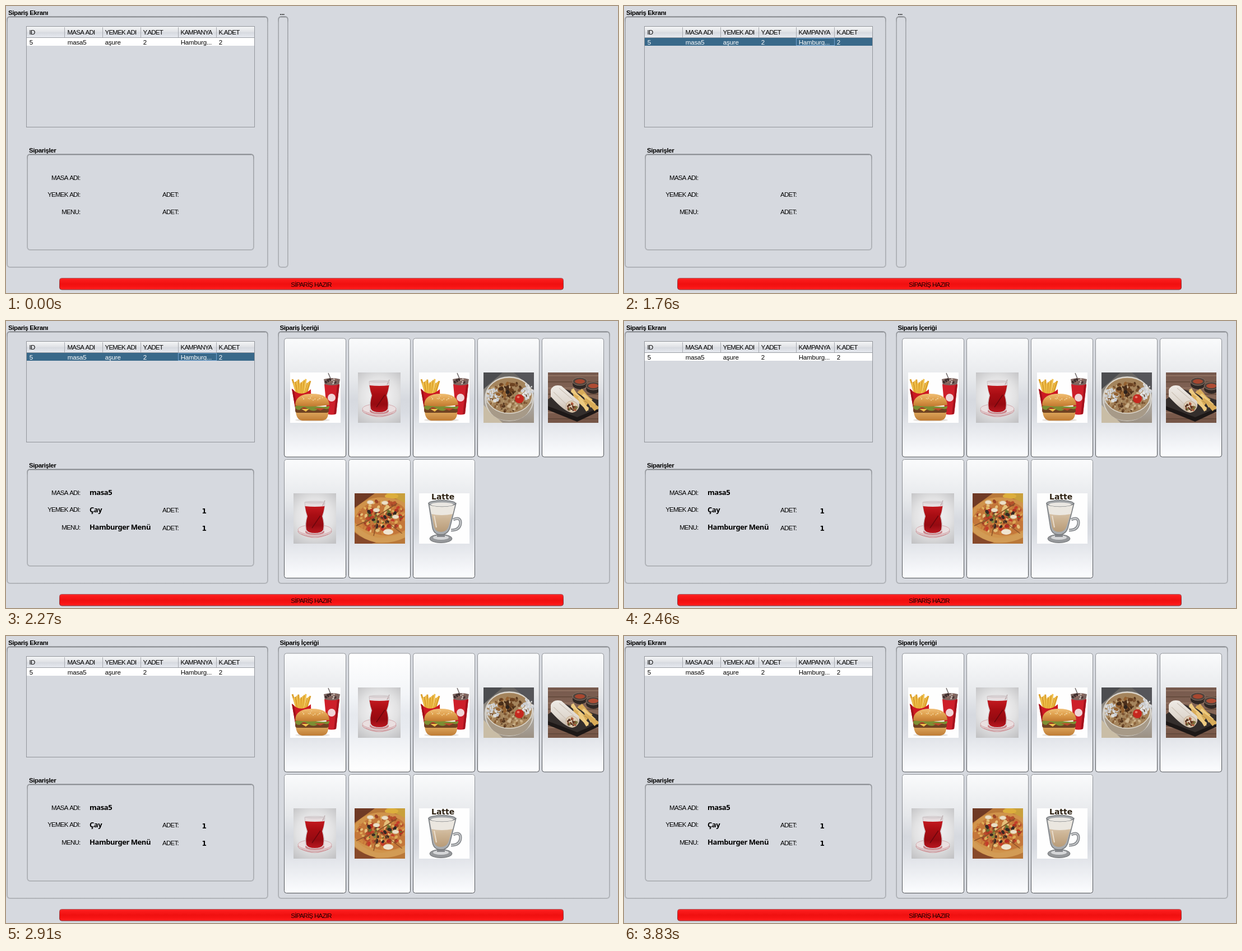
An HTML page with a canvas that plays this animation: 1092 by 513 pixels, repeating every 4390 ms.

```html
<!DOCTYPE html>
<html lang="tr">
<head>
<meta charset="utf-8">
<title>Sipariş Ekranı</title>
<style>
html, body { margin: 0; width: 100%; height: 100%; overflow: hidden; background: #d6d9df; }
canvas { display: block; }
</style>
</head>
<body>
<canvas id="stage" width="1092" height="513"></canvas>
<script>
const ctx = document.getElementById('stage').getContext('2d');
const LOOP = 4390;
const SELECT = 1760, OPEN = 1990, DESELECT = 2460, HOVER = [2830, 2910, 3000];
const SANS = '"Liberation Sans", Arial, sans-serif';
const PLAIN = { font: '11.5px ' + SANS, gap: -0.15 };
const CAPS = { font: '11.5px ' + SANS, gap: -0.75 };
const BOLD = { font: 'bold 11.5px ' + SANS, gap: -0.4 };
const VALUE = { font: 'bold 13px "Noto Sans", "Open Sans", sans-serif', gap: -0.45 };
const DIGIT = { font: 'bold 12px "DejaVu Sans", sans-serif', gap: 0 };
const MUG = { font: 'bold 14px "DejaVu Sans", sans-serif', gap: 0 };

function text(s, x, y, style, color = '#000', align = 'left') {
  ctx.font = style.font;
  ctx.letterSpacing = style.gap + 'px';
  ctx.textAlign = align;
  ctx.fillStyle = color;
  ctx.fillText(s, x, y);
}

function rect(x, y, w, h, color) {
  ctx.fillStyle = color;
  ctx.fillRect(x, y, w, h);
}

// Vertical gradient from [offset, colour] stops
function shade(y0, y1, ...stops) {
  const g = ctx.createLinearGradient(0, y0, 0, y1);
  stops.forEach(([at, c]) => g.addColorStop(at, c));
  return g;
}

function paint(fill, stroke, line = 1) {
  if (fill) { ctx.fillStyle = fill; ctx.fill(); }
  if (stroke) { ctx.strokeStyle = stroke; ctx.lineWidth = line; ctx.stroke(); }
}

function round(x, y, w, h, r, fill, stroke, line) {
  ctx.beginPath();
  ctx.roundRect(x, y, w, h, r);
  paint(fill, stroke, line);
}

function oval(x, y, rx, ry, fill, stroke, line, turn = 0) {
  ctx.beginPath();
  ctx.ellipse(x, y, rx, ry, turn, 0, 7);
  paint(fill, stroke, line);
}

function path(d, fill, stroke, line = 1) {
  const p = new Path2D(d);
  if (fill) { ctx.fillStyle = fill; ctx.fill(p); }
  if (stroke) { ctx.strokeStyle = stroke; ctx.lineWidth = line; ctx.stroke(p); }
}

function stick(x, y, w, h, turn, color) {
  ctx.save();
  ctx.translate(x, y);
  ctx.rotate(turn);
  rect(-w / 2, -h / 2, w, h, color);
  ctx.restore();
}

function seeded(seed) {
  return () => (seed = (seed * 16807) % 2147483647) / 2147483647;
}

function crumbs(n, seed, x, y, rx, ry, size, colors) {
  const rnd = seeded(seed);
  for (let i = 0; i < n; i++) {
    const a = rnd() * 6.283, d = Math.sqrt(rnd()), s = size * (0.6 + rnd() * 0.7);
    oval(x + Math.cos(a) * d * rx, y + Math.sin(a) * d * ry, s, s * 0.7,
      colors[i % colors.length], null, 1, rnd() * 3);
  }
}

function burger() {
  rect(0, 0, 90, 90, '#fefefe');
  for (let i = 0; i < 13; i++) {
    const k = i - 6;
    stick(20 + k * 2, 25 + i * 7 % 9, 3, 27, k * 0.05, i % 2 ? '#f0c04c' : '#dca02c');
  }
  path('M3 29Q19 46 37 30L38 69H10Z', '#cc1822');
  path('M3 29L7 32L14 69H10Z', '#a30f1a');
  path('M73 13L68 1', null, '#6d6666', 1.5);
  path('M60 12Q75 8 89 12L87 23H62Z', '#7c6560');
  crumbs(16, 9, 75, 16, 12, 4, 2, ['#3c2b2a', '#cdbdb5', '#8f6a5f']);
  path('M61 21Q75 25 88 21L82 74Q74 77 66 74Z', '#cd1f2a');
  path('M84 23L88 21L82 74L78 75Z', '#a5121d');
  oval(74, 45, 7, 7, '#f0d5d7');
  oval(40, 85, 31, 2.5, '#e4dfda');
  path('M10 69H68Q69 85 57 86H22Q11 85 10 69Z', shade(69, 86, [0, '#e0ab60'], [1, '#bf7c35']));
  round(9, 64, 60, 8, 4, '#6f4222');
  path('M9 60Q23 55 40 59T70 60Q71 67 62 65T47 67T32 65T17 67Q8 67 9 60Z', '#7c8f33');
  path('M20 65H34L28 70Z', '#f0bf4c');
  path('M43 64H62L54 68Z', '#bd4a2c');
  path('M9 59Q9 38 39 38Q69 38 70 58Q40 63 9 59Z',
    shade(38, 61, [0, '#efbd73'], [0.45, '#dfa04e'], [1, '#c0772f']));
  crumbs(18, 5, 39, 45, 23, 5, 0.8, ['#f8e4b8']);
}

function tea() {
  const g = ctx.createRadialGradient(38, 40, 8, 38, 42, 58);
  g.addColorStop(0, '#f3f2f3');
  g.addColorStop(0.5, '#e2e2e3');
  g.addColorStop(1, '#c3c3c5');
  rect(0, 0, 76, 90, g);
  oval(38, 68, 30, 9, '#dfc9cb', '#c9959a', 1);
  oval(38, 65, 30, 9, '#eadfe0', '#d3a9ad', 1);
  oval(38, 69, 17, 5, '#c9757b');
  path('M20 16Q21 31 24 41Q20 54 22 66Q24 72 38 72Q52 72 54 66Q56 54 52 41Q55 31 56 16Z', '#e6dddf', '#cabfc2');
  path('M20.5 23Q22 33 25 41Q21 54 23 65Q26 71 38 71Q50 71 53 65Q55 54 51 41Q54 33 55.5 23Q38 25 20.5 23Z',
    shade(22, 72, [0, '#c41a20'], [0.35, '#a80d13'], [0.7, '#960a11'], [1, '#bd1922']));
  path('M33 62L48 40', null, '#6d070d', 1.5);
  path('M52 22L56 13', null, '#b9a7a9', 1.5);
  oval(38, 16, 18, 1.8, null, '#d0c8ca');
  path('M14 73Q38 85 62 73', null, '#cf8d92', 1.2);
}

function pudding() {
  rect(0, 0, 90, 90, shade(0, 90, [0, '#63615f'], [0.3, '#8c8780'], [0.7, '#a9a49d'], [1, '#9c9184']));
  path('M0 0H34L0 30Z', '#4c4d50');
  path('M54 0H90V32Z', '#56565a');
  path('M0 58L34 90H0Z', '#c9bda6');
  oval(46, 47, 43, 39, '#bcb8b1', '#d6d3cd', 2);
  path('M5 54Q12 86 46 86T87 54Q46 80 5 54Z', '#a79a88');
  oval(46, 41, 41, 32, '#a4845c', '#dcd6cb', 1.5);
  crumbs(120, 21, 46, 43, 37, 28, 2.7, ['#7b5230', '#bb9c6e', '#8c633b', '#cdb48e', '#58381f']);
  crumbs(60, 4, 17, 41, 12, 12, 2.3, ['#dededd', '#c8cbcf']);
  crumbs(60, 8, 78, 34, 10, 14, 2.3, ['#e2e2e2', '#cdd0d4']);
  crumbs(22, 33, 40, 32, 17, 15, 4, ['#6c4322', '#4a2e1a', '#956231']);
  oval(43, 35, 3.5, 3.5, '#2f241d');
  oval(64, 47, 8, 8, '#c5281f');
  oval(62, 44, 2.5, 2, '#e77d6b');
}

function wrap() {
  rect(0, 0, 90, 90, shade(0, 90, [0, '#76594d'], [0.5, '#856656'], [1, '#755546']));
  for (let i = 0; i < 8; i++) rect(0, 5 + i * 11, 90, 1.5, i % 2 ? '#604739' : '#977867');
  path('M0 48L28 29L90 49V68L52 82L0 60Z', '#342e2c');
  path('M0 60L52 80L90 64V70L52 88L0 67Z', '#1d1817');
  [[57, 16, '#a8472f'], [81, 24, '#b04c33']].forEach(([x, y, c]) => {
    oval(x, y + 5, 13, 9, '#2f2724');
    oval(x, y, 13, 7, '#51433c', '#8d7769');
    oval(x, y, 9, 4, c);
  });
  for (let i = 0; i < 12; i++) {
    stick(51 + i * 5 % 28, 42 + i * 7 % 21, 5.5, 29, -0.55 - i % 4 * 0.14, i % 2 ? '#d9ac59' : '#edca80');
  }
  path('M5 31Q10 20 24 24L55 51Q60 66 44 72Q31 72 5 43Z',
    shade(22, 72, [0, '#efebe6'], [0.6, '#e0d8cf'], [1, '#bfb0a0']));
  path('M10 35L34 58M20 28L46 50', null, '#cec4b8', 1.2);
  oval(43, 61, 11, 10, '#dfcdb6', '#c0a98e', 1, 0.4);
  crumbs(28, 17, 43, 62, 8, 7, 2.2, ['#7b4026', '#a9583a', '#4e2c1c', '#7b7440']);
}

function pizza() {
  rect(0, 0, 90, 90, '#b97839');
  path('M0 0H36L0 26Z', '#6f3a25');
  path('M56 0H90V18Z', '#c9a03c');
  oval(66, 5, 12, 5, '#dcae3c');
  path('M-8 42Q12 2 60 8T98 46L90 72Q68 88 40 82Q18 76 -8 58Z', '#d0934b');
  path('M0 44Q18 10 58 14T90 44V66Q64 80 40 73Q12 66 0 52Z', '#c4773a');
  crumbs(130, 12, 48, 42, 44, 29, 3.2, ['#dda957', '#b5502c', '#cf853e', '#e5c07a', '#9c4526']);
  crumbs(18, 29, 47, 42, 39, 27, 3.8, ['#b52f21', '#c43f2a']);
  crumbs(15, 44, 49, 42, 38, 25, 2.8, ['#66702f', '#858a3d']);
  crumbs(12, 70, 47, 38, 34, 23, 3.4, ['#362924']);
  [[28, 16], [54, 17], [39, 30], [73, 42]].forEach(([x, y]) =>
    oval(x, y, 6, 3.5, '#ecdfc8', '#d2b588'));
  path('M42 40L3 58M42 40L85 72M42 40L34 76M42 40L76 18', null, '#8d5429', 1.5);
  oval(60, 69, 9, 5, '#efe4d0');
  path('M0 57Q24 77 40 79T90 70V79Q66 91 38 88Q16 83 0 68Z', '#d29b55');
  path('M0 70Q16 83 38 88L30 90H0Z', '#87492a');
}

function latte() {
  rect(0, 0, 90, 90, '#fefefe');
  path('M61 47Q74 41 74 53Q73 66 57 66', null, '#85888c', 5);
  path('M61 47Q74 41 74 53Q73 66 57 66', null, '#d0d2d4', 1.8);
  oval(39, 81, 20, 7.5, '#96989b', '#6e7174', 1);
  oval(39, 79, 14, 4, '#d5d6d8');
  rect(32, 68, 14, 10, '#85878b');
  path('M17 18L24 62Q27 74 39 74T55 62L66 18Z', '#a8abae', '#75787b', 1.3);
  path('M21 30L27 61Q30 69 39 69T52 61L62 30Z',
    shade(30, 69, [0, '#dccab2'], [0.4, '#cdb596'], [1, '#b89b78']));
  path('M19 21L22 37Q40 41 60 37L64 21Z', '#ebe7e0');
  oval(41, 18, 24, 5.5, '#a5a8ab', '#777a7d', 1.3);
  oval(41, 20, 20, 3.5, '#eae7e2');
  path('M27 40L31 61', null, '#e9dccb', 2);
  text('Latte', 22, 11, MUG, '#2e2213');
}

const DISHES = [burger, tea, burger, pudding, wrap, tea, pizza, latte];

function dishButton(i, hover) {
  const x = 496 + 115 * (i % 5), y = i < 5 ? 30.5 : 247, h = 212.5;
  const fill = hover
    ? shade(y, y + h, [0, '#ffffff'], [0.35, '#f3f5f8'], [0.52, '#e6e9ee'], [0.62, '#e8ebf0'], [1, '#ffffff'])
    : shade(y, y + h, [0, '#fafbfc'], [0.35, '#e6e8eb'], [0.52, '#d6d9df'], [0.62, '#d9dce2'], [1, '#fcfdff']);
  round(x + 0.5, y + 0.5, 110, h - 0.5, 4, fill,
    shade(y, y + h, [0, '#93969b'], [0.6, '#777a7f'], [1, '#4d5054']));
  const w = DISHES[i] === tea ? 76 : 90;
  ctx.save();
  ctx.translate(x + (w < 90 ? 17 : 11), i < 5 ? 92 : 308);
  ctx.beginPath();
  ctx.rect(0, 0, w, 90);
  ctx.clip();
  DISHES[i]();
  ctx.restore();
}

function panel(x, y, w, h) {
  const tone = (a, b, c) => shade(y, y + h, [0, a], [Math.min(0.1, 12 / h), b], [1, c]);
  round(x + 1, y + 1, w - 2, h - 2, 5, null, tone('#9c9fa4', '#b5b8bd', '#b7babf'), 2);
  round(x + 1.5, y + 1.5, w - 3, h - 3, 4, null, tone('#85888d', '#a1a4a9', '#abaeb3'), 1);
  rect(x + 5, y + 2, w - 10, 1, '#b4b7bc');
}

function table(selected) {
  const cols = [37, 104.5, 172, 240, 307, 375];
  const heads = ['ID', 'MASA ADI', 'YEMEK ADI', 'Y.ADET', 'KAMPANYA', 'K.ADET'];
  const cells = ['5', 'masa5', 'aşure', '2', 'Hamburg...', '2'];
  rect(37, 37, 406, 19, shade(37, 56, [0, '#f5f6f7'], [0.5, '#dfe1e5'], [0.55, '#d7dae0'], [1, '#e6e9ef']));
  rect(37, 56, 406, 1, '#9a9da3');
  rect(37, 57, 406, 14, selected ? '#39698a' : '#fff');
  cols.forEach((x, i) => {
    if (i) rect(Math.floor(x), 38, 1, 18, '#a6a9af');
    text(heads[i], Math.round(x) + 4.5, 50.5, CAPS);
    text(cells[i], Math.round(x) + 4.7, 68.5, PLAIN, selected ? '#fff' : '#000');
  });
  ctx.lineWidth = 1;
  if (selected) {
    ctx.strokeStyle = '#73a4d1';
    ctx.strokeRect(307.5, 57.5, 68, 13);
  }
  ctx.strokeStyle = '#92959b';
  ctx.strokeRect(36.5, 36.5, 407, 180);
}

function draw(selected, open, hover) {
  const grow = open ? 2 : 0, low = open ? 1 : 0;
  rect(0, 0, 1092, 513, '#d6d9df');
  text('Sipariş Ekranı', 4, 15.5, BOLD);
  panel(1, 18, 467, 450 + grow);
  table(selected);

  text('Siparişler', 41, 261.5, BOLD);
  panel(37, 264, 406, 173 + grow);
  text('MASA ADI:', 132.5, 310.5, CAPS, '#000', 'right');
  text('YEMEK ADI:', 132.5, 341, CAPS, '#000', 'right');
  text('MENU:', 132.5, 371.5 + low, CAPS, '#000', 'right');
  text('ADET:', 279, 341 + low, CAPS);
  text('ADET:', 279, 371.5 + grow, CAPS);

  text(open ? 'Sipariş İçeriği' : '...', 488.5, 15.5, BOLD);
  panel(485, 18, open ? 593 : 19, 450 + grow);
  if (open) {
    text('masa5', 149, 310.5, VALUE);
    text('Çay', 149, 342, VALUE);
    text('Hamburger Menü', 149, 373, VALUE);
    text('1', 349.5, 343.5, DIGIT);
    text('1', 349.5, 375, DIGIT);
    DISHES.forEach((_, i) => dishButton(i, i === hover));
  }

  const y = 486.5 + grow;
  round(95.5, y, 899, 20.5, 4,
    shade(y, y + 21, [0, '#ff3030'], [0.15, '#fb1a1a'], [0.5, '#f01010'], [0.75, '#f81414'], [1, '#ff2626']),
    shade(y, y + 21, [0, '#a5565b'], [1, '#7c3035']));
  text('SİPARİŞ HAZIR', 544.5, 501.5 + grow, CAPS, '#1c0000', 'center');
}

let last = '';
const start = performance.now();

function tick() {
  const t = (performance.now() - start) % LOOP;
  const selected = t >= SELECT && t < DESELECT;
  const hover = t < HOVER[0] ? -1 : t < HOVER[1] ? 0 : t < HOVER[2] ? 1 : -1;
  const state = [selected, t >= OPEN, hover];
  if (String(state) !== last) {
    draw(...state);
    last = String(state);
  }
  requestAnimationFrame(tick);
}
tick();
</script>
</body>
</html>
```
